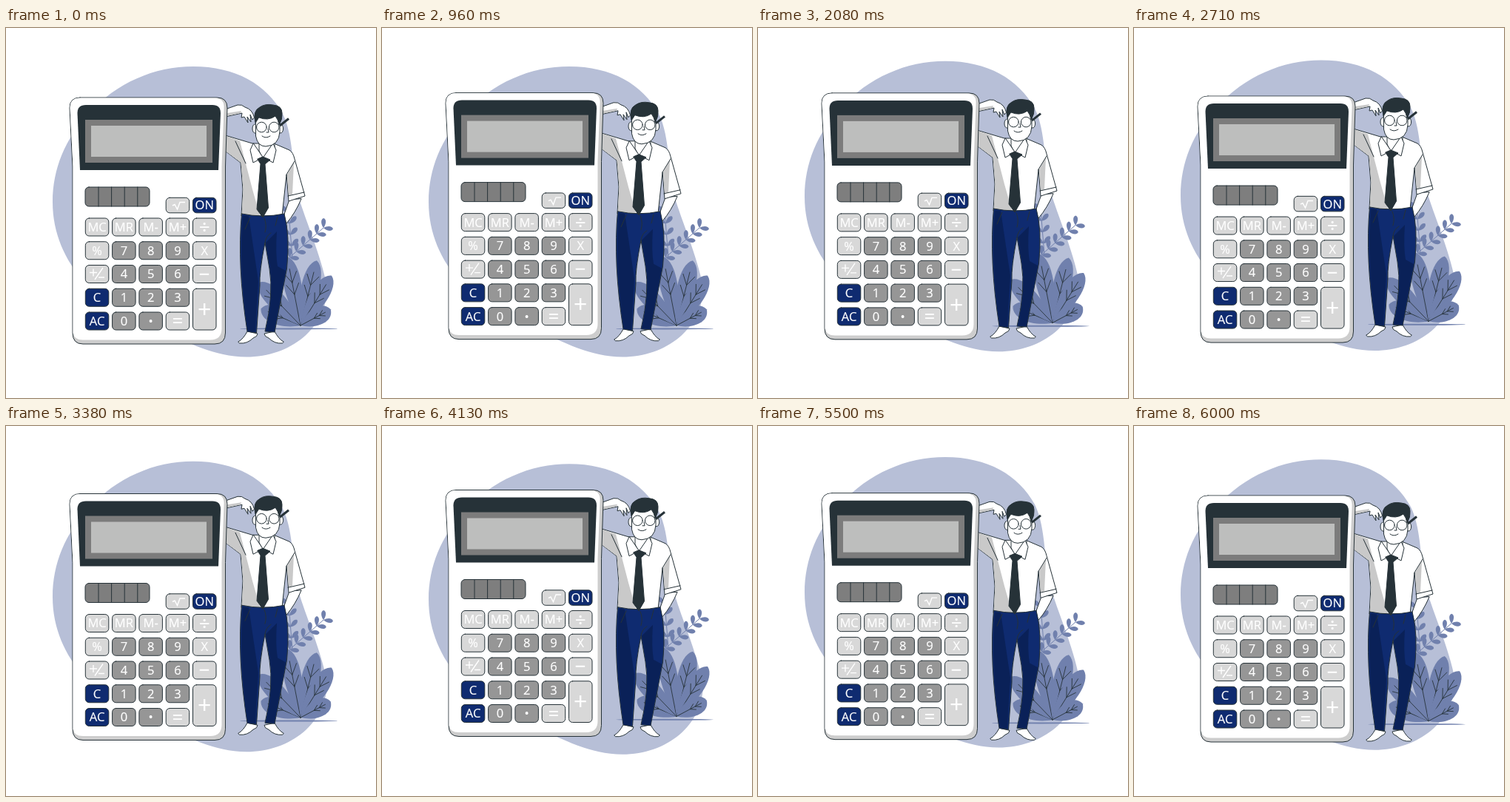
These frames come from a looping animation (500 px wide and 500 px high, 6.04 s). An HTML page:

```html
<!DOCTYPE html>
<html lang="en">
<head>
<meta charset="utf-8">
<title>Man with calculator</title>
<style>
  html, body { margin: 0; width: 100%; height: 100%; overflow: hidden; background: #fff; }
  svg { display: block; width: 100%; height: 100%; }
  .ink { stroke: #263238; stroke-width: 1; stroke-linecap: round; stroke-linejoin: round; }
  .line { fill: none; }
  .skin { fill: #fff; }
  .shade { fill: #c9c9c9; }
  .dark { fill: #263238; }
  .blue { fill: #0f2b70; }
  .navy { fill: #0a2158; }
  .vein { fill: none; stroke: #263238; stroke-width: .8; stroke-linecap: round; }
  .sign { fill: none; stroke: #fff; stroke-width: 1.4; }
  text { font-family: "Open Sans", "Noto Sans", sans-serif; fill: #fff; stroke: #fff; stroke-width: .2; text-anchor: middle; }
</style>
</head>
<body>
<svg viewBox="0 0 500 500">
  <path id="blob" fill="#b7bfd7" d="M253 52C310 52 352 76 374 116C390 148 386 198 396 230C404 258 426 308 434 350
    C434 405 385 444.5 325 444.5C280 444 250 426 200 405C130 380 63 320 63 235C63 190 80 150 112 115C150 74 200 52 253 52Z"/>

  <g id="plant" fill="#7080ad"></g>

  <g id="man">
    <path class="ink skin" d="M296 110L313 104Q319 103 323 107Q333 110 335.500 121L333 124L330 117L331 127L326 120L327 128L322 120L318 121L319 115L296 120Z"/>
    <path class="shade" d="M296 115.500L318 112L317 115L296 119.500Z"/>

    <path class="ink skin" d="M383 232L373 260L379 264Q391 250 399 231Z"/>
    <path class="ink skin" d="M296 145L333 156H362L383 165Q388 168 390 177L404 227L382 234L379 198L373 254H318L320 218L317 182L296 166Z"/>
    <path class="shade" d="M296 145.500L316 152.500L333 218L343 253H318.500L320.500 218L317.500 182L296 166Z"/>
    <path class="shade" d="M389 182L380 198L382 226L387 225Z"/>
    <path class="ink line" d="M310 153L324 183M379 198L390 180M381 227L403 222"/>

    <g data-flip="344.5"><path class="ink skin" d="M314 424Q321 420 326 410L340 413Q340 417 334 419Q326 427 316 426Z"/></g>
    <path class="ink blue" d="M318.500 251Q347 257 376 251Q384 280 379.500 325L363 411L350 410Q362 360 356 325L350 290
      Q342 330 343 348L338.500 412L326 410Q312 320 318.500 251Z"/>
    <path class="navy" d="M320 253L328 254L341 342L337 411L326.500 410Q314 320 320 253Z"/>
    <path class="navy" d="M351 290L366 275Q364 305 367 322L378 328L362.500 410L351 409.500Q362 360 357 325Z"/>
    <path class="ink line" d="M350 290Q351 281 358 277M349 257Q353 266 350 276M330 256L323 272M367 255L364 267"/>

    <path class="ink skin" d="M342 152V166L347 177L363 164V150Z"/>
    <g data-flip="347.5"><path class="ink skin" d="M334 156L330 165L334 182L347 175Z"/></g>
    <path class="ink dark" d="M340 177L347 174L357 178L350 184L354.500 243L347 256L339 245L344 184Z"/>

    <g data-flip="353.8"><ellipse class="ink skin" cx="336.500" cy="136" rx="3.500" ry="6"/></g>
    <path class="ink skin" d="M337.500 119V146Q340 160 351 160Q369 159 370 140V119Z"/>
    <path class="ink dark" d="M337 128Q333 112 343 107Q350 102 361 104Q373 105 373 115Q374 123 369 131Q368 124 364 119Q354 126 342 121Z"/>
    <path d="M370 132L382 122.500" stroke="#263238" stroke-width="3"/>
    <g data-flip="353.8"><circle class="ink line" cx="345.400" cy="134" r="6.800"/></g>
    <path class="ink line" d="M354 136L355 141H352M346 146Q351 150 357 146"/>
  </g>

  <g id="calc">
    <path class="ink" fill="#cdcdcd" d="M100 94H285Q299 94 299 108L296.500 187V412Q296.500 427 282 427H104Q90 427 90 412V187L86 108Q86 94 100 94Z"/>
    <path class="skin" d="M100 94.500H283Q296 95 294.500 110L291.500 187V406Q291.500 421.500 276 421.500H104Q92 421.500 90.500 412V187L86.500 108Q86.500 94.500 100 94.500Z"/>
    <path class="dark" d="M108 104H279Q290 104 290 115L287 192H100L96.500 115Q96.500 104 108 104Z"/>
    <rect x="111" y="128" width="164" height="50" fill="#bdbebd" stroke="#7c7c7c" stroke-width="8"/>
    <rect class="ink" x="107" y="215" width="87" height="26" rx="5" fill="#7e7e7e"/>
    <g id="keys"></g>
    <path class="sign" d="M113 330.500h10m-5-5v10M120 340l11-16M125 337h8M225 240l3-1.500l3.500 6.500l3.500-9.500h7"/>
  </g>
</svg>
<script>
  const $ = id => document.getElementById(id);
  const range = n => [...Array(n).keys()];

  // Symmetric parts: copy each group mirrored about its x axis
  for (const g of document.querySelectorAll('[data-flip]')) {
    const twin = g.cloneNode(true);
    twin.setAttribute('transform', `matrix(-1 0 0 1 ${2 * g.dataset.flip} 0)`);
    g.after(twin);
  }

  // Keypad and solar cell dividers
  const PITCH_X = 36.3, PITCH_Y = 31.75;
  function key(label, col, row) {
    if (label === '#') return '';
    const x = 107.3 + PITCH_X * col, y = row ? 225.25 + PITCH_Y * row : 229.3;
    const h = row === 0 ? 20.5 : label === '+' ? 24 + PITCH_Y : 24;
    const fill = /^(ON|C|AC)$/.test(label) ? '#0f2b70' : /[\d•]/.test(label) ? '#969696' : '#d8d8d8';
    const size = label === '+' ? 32 : /[÷−=]/.test(label) ? 26 : 16.5;
    return `<rect class="ink" x="${x}" y="${y}" width="31.5" height="${h}" rx="5" fill="${fill}"/>
      <text x="${x + 15.75}" y="${y + h / 2 + .36 * size}" font-size="${size}">${label.replace('_', '')}</text>`;
  }
  const layout = ['# # # _ ON', 'MC MR M- M+ ÷', '% 7 8 9 X', '_ 4 5 6 −', 'C 1 2 3 +', 'AC 0 • = #'];
  $('keys').innerHTML =
    layout.map((line, row) => line.split(' ').map((label, col) => key(label, col, row)).join('')).join('') +
    range(4).map(i => `<path class="ink" d="M${125 + 17.6 * i} 215v26"/>`).join('');

  // Foliage: a leaf grows along +x, then is placed and turned
  const place = (x, y, deg, body) => `<g transform="translate(${x} ${y}) rotate(${deg})">${body}</g>`;
  const blade = (len, w) =>
    `<path d="M0 0C${len * .35} ${w * .65} ${len * .9} ${w * .8} ${len} 0C${len * .9} ${-w * .8} ${len * .35} ${-w * .65} 0 0Z"/>`;
  const ribs = len => `<path class="vein" d="M0 0H${len * .82}` +
    [.45, .62].map(k => `M${len * k} 0l${len * .15} ${-len * .09}M${len * k} 0l${len * .15} ${len * .09}`).join('') + '"/>';

  function sprig(x, y, tipX, tipY, pairs) {
    const dx = tipX - x, dy = tipY - y, deg = Math.atan2(dy, dx) * 180 / Math.PI;
    return `<path d="M${x} ${y}L${tipX} ${tipY}" stroke="#7080ad"/>` + range(pairs).map(i => {
      const k = 1 - i / pairs;
      return [-48, 48].map(turn => place(x + dx * k, y + dy * k, deg + turn, blade(13, 5.5))).join('');
    }).join('');
  }
  function fan(deg) {
    const len = 95 - 42 * ((deg + 97) / 64) ** 2;
    return place(398, 402, deg, blade(len, 22) + ribs(len));
  }
  $('plant').innerHTML =
    '<ellipse cx="382" cy="406.400" rx="66" ry="1"/>' +
    sprig(374, 318, 429, 270, 6) + sprig(387, 310, 382, 249, 4) +
    [-157, -134, -101, -76, -58, -28].map(fan).join('');

  // Floating: delay and period in seconds
  const LOOP = 6040, FPS = 24, RISE = 10;
  const floats = [['calc', 0, 3], ['man', 0, 6], ['blob', 1, 3], ['plant', 1, 6]];

  function lift(t, delay, period) {
    const p = Math.max(0, t - delay) / period % 1;
    return -RISE * (1 - Math.abs(2 * p - 1));
  }
  const start = performance.now();
  function draw(now) {
    const ms = Math.max(0, now - start) % LOOP;
    const t = Math.floor((ms + 4) * FPS / 1000) / FPS;
    for (const [id, delay, period] of floats)
      $(id).setAttribute('transform', `translate(0 ${lift(t, delay, period).toFixed(3)})`);
    requestAnimationFrame(draw);
  }
  draw(start);
</script>
</body>
</html>
```
